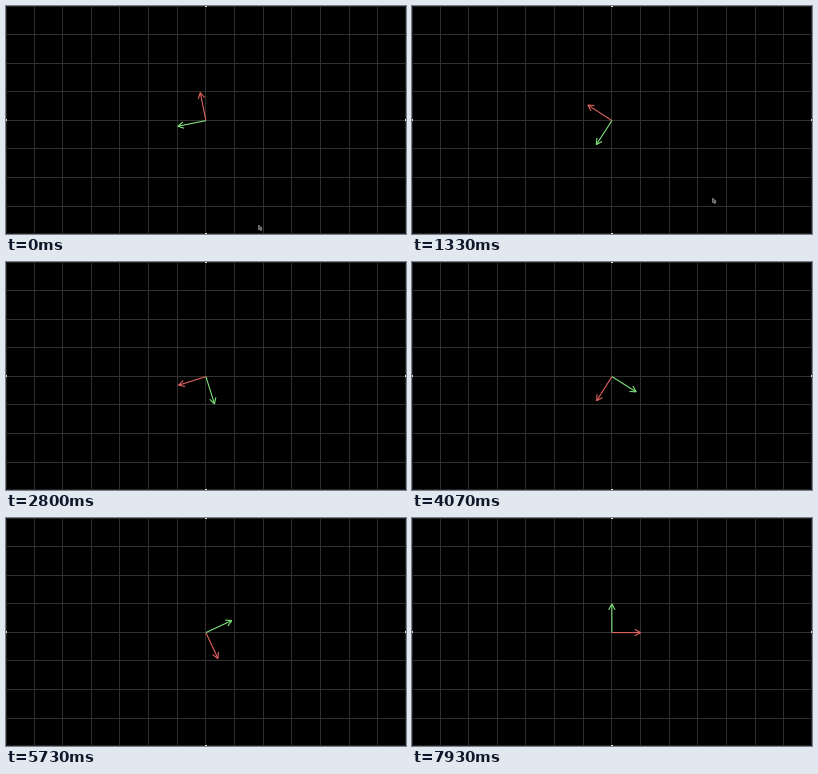
These frames come from a looping animation (400 by 228 pixels, 8 s). A matplotlib script:

```python
import numpy as np
import matplotlib.pyplot as plt
from matplotlib.animation import FuncAnimation
from matplotlib.patches import Polygon, Rectangle

W, H, DPI = 400, 228, 64
LOOP, STEP = 8000, 40
PX = 72 / DPI
UNIT = 28.6
ORIGIN = np.array([199.9, 114.6])
GRID, RED, GREEN = "#303030", "#e0625e", "#7fe37c"

# rotation of the basis in degrees: nearly steady, settling at a full turn
TIMES = [0, 1330, 2800, 4070, 5730, 6870, 7400, 7800, 7930]
ANGLES = [101.4, 147.4, 197.5, 238.8, 295.3, 333, 349.5, 359.7, 360.2]

CURSOR_START, CURSOR_END = np.array([252.6, 219.2]), np.array([300.6, 192.2])
CURSOR_SHAPE = np.array([[0, 0], [0, 4.6], [1.2, 3.7], [2.1, 5.4],
                         [2.9, 5.0], [2.2, 3.4], [3.6, 3.2]])
CURSOR_TRAVEL, CURSOR_HIDE = 800, 2200

fig = plt.figure(figsize=(W / DPI, H / DPI), dpi=DPI, facecolor="black")
ax = fig.add_axes([0, 0, 1, 1])
ax.set_xlim(0, W)
ax.set_ylim(H, 0)
ax.axis("off")


def bar(x, y, w, h, color):
    ax.add_patch(Rectangle((x, y), w, h, fc=color, lw=0, aa=False))


for k in range(-6, 7):
    bar(np.floor(199.9 + 28.65 * k), 0, 1, H, GRID)
for k in range(-3, 4):
    bar(0, np.floor(114.3 + UNIT * k), W, 1, GRID)
for x in (0, W - 1):
    bar(x, 0, 1, H, "#242424")
for y in (0, H - 1):
    bar(0, y, W, 1, "#242424")
for x, y, w, h in [(199, 0, 2, 1), (199, H - 1, 2, 1),
                   (0, 113, 1, 2), (W - 1, 113, 1, 2)]:
    bar(x, y, w, h, "#d8d8d8")


def make_arrow(color):
    return [ax.plot([], [], color=color, lw=1.1 * PX, solid_capstyle="butt",
                    solid_joinstyle="miter")[0] for _ in range(2)]


red, green = make_arrow(RED), make_arrow(GREEN)
cursor = ax.add_patch(Polygon(CURSOR_SHAPE, fc="#505050", ec="#a8a8a8",
                              lw=0.6 * PX))


def aim(arrow, degrees):
    a = np.radians(degrees)
    along = np.array([np.cos(a), -np.sin(a)])
    side = np.array([along[1], -along[0]])
    tip = ORIGIN + UNIT * along
    back = tip - 5.8 * along
    arrow[0].set_data(*np.array([ORIGIN, tip]).T)
    arrow[1].set_data(*np.array([back + 3.2 * side, tip, back - 3.2 * side]).T)


def draw(i):
    t = i * STEP
    angle = np.interp(t, TIMES, ANGLES)
    aim(red, angle)
    aim(green, angle + 90)
    u = min(t / CURSOR_TRAVEL, 1)
    u = u * u * (3 - 2 * u)
    cursor.set_xy(CURSOR_SHAPE + CURSOR_START + u * (CURSOR_END - CURSOR_START))
    cursor.set_visible(t < CURSOR_HIDE)
    return [*red, *green, cursor]


anim = FuncAnimation(fig, draw, frames=LOOP // STEP, interval=STEP,
                     repeat=True, repeat_delay=0)
plt.show()
```
